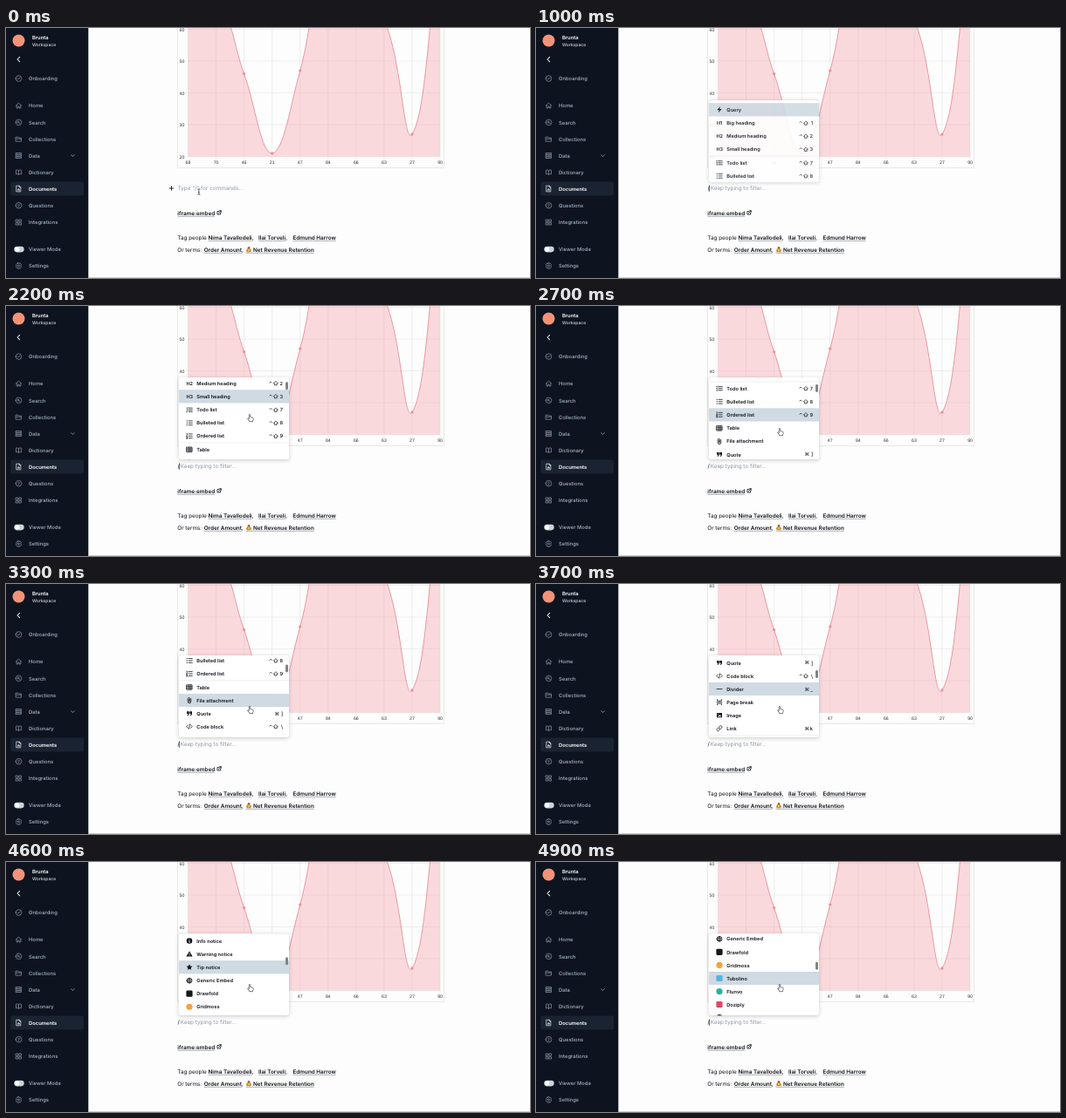
An HTML page that plays this animation: 600x287 px, repeating every 5 s.

```html
<!DOCTYPE html>
<html lang="en">
<head>
<meta charset="utf-8">
<title>Slash command menu</title>
<style>
html, body { margin: 0; width: 100%; height: 100%; overflow: hidden; background: #fdfdfd; }
svg { display: block; width: 100%; height: 100%; }
text { font-family: Inter, "Liberation Sans", sans-serif; text-rendering: geometricPrecision; white-space: pre; }
.axis { font-family: "Liberation Sans", Arial, sans-serif; }
.key { font-family: "DejaVu Sans", sans-serif; }
</style>
</head>
<body>
<svg id="stage" viewBox="0 0 600 287" preserveAspectRatio="none">
  <defs><clipPath id="menuClip"><rect x="198" y="82" width="126" height="94.3" rx="1.7"/></clipPath></defs>
</svg>
<script>
const stage = document.getElementById('stage');
const INK = '#10141c', HINT = '#8c96a8', BODY = 6.35;

function add(parent, tag, attrs = {}) {
  const el = document.createElementNS('http://www.w3.org/2000/svg', tag);
  for (const k in attrs) el.setAttribute(k, attrs[k]);
  parent.append(el);
  return el;
}
const group = (parent = stage) => add(parent, 'g');
const rect = (p, x, y, width, height, fill, rx = 0) => add(p, 'rect', { x, y, width, height, fill, rx });
const line = (p, d, stroke, width = 0.5) =>
  add(p, 'path', { d, stroke, fill: 'none', 'stroke-width': width });

// Text is placed by the vertical centre of its capitals.
function label(p, str, x, mid, size, fill, weight = 400, extra = {}) {
  const el = add(p, 'text', { x, y: mid + size * 0.36, 'font-size': size, fill, 'font-weight': weight, ...extra });
  el.textContent = str;
  return el;
}

// Icons live on a 24-unit grid.
function icon(p, d, x, y, size, color, filled = false, width = 2) {
  return add(p, 'path', {
    d, transform: `translate(${x - size / 2} ${y - size / 2}) scale(${size / 24})`,
    fill: filled ? color : 'none', 'fill-rule': 'evenodd',
    stroke: filled ? 'none' : color, 'stroke-width': width,
    'stroke-linecap': 'round', 'stroke-linejoin': 'round'
  });
}

const RING = 'M2 12a10 10 0 1 0 20 0a10 10 0 1 0-20 0z';
const ICONS = {
  check: RING + 'M8 12l3 3 5-6',
  home: 'M3 12l9-9 9 9M5 10v11h5v-6h4v6h5V10',
  search: RING + 'M8 11a3 3 0 1 0 6 0a3 3 0 1 0-6 0M16.500 16.500l-3-3',
  folder: 'M3 5h7l2 3h9v12H3zM3 11h18',
  data: 'M3 3h18v5H3zM3 9.500h18v5H3zM3 16h18v5H3z',
  book: 'M12 6c-3-2-6-2-9-1v14c3-1 6-1 9 1 3-2 6-2 9-1V5c-3-1-6-1-9 1v14',
  doc: 'M5 2h9l5 5v15H5zM14 2v5h5M9 17v-3M12 17v-5M15 17v-2',
  help: RING + 'M9.500 10c0-3.500 5-3.500 5 0 0 2-2.500 2-2.500 4M12 17v.1',
  blocks: 'M3 3h7v7H3zM14 3h7v7h-7zM3 14h7v7H3zM14 14h7v7h-7z',
  gear: 'M9 12a3 3 0 1 0 6 0a3 3 0 1 0-6 0M10 2h4l1 3 3-1 3 4-2 4 2 4-3 4-3-1-1 3h-4l-1-3-3 1-3-4 2-4-2-4 3-4 3 1z',
  bolt: 'M15 0L3 14h8l-3 10 13-14h-8z',
  todo: 'M1 5l2 2 3-4M1 12l2 2 3-4M1 19l2 2 3-4M10 5h13M10 12h13M10 19h13',
  bullets: 'M2 4h2M2 12h2M2 20h2M9 4h14M9 12h14M9 20h14',
  ordered: 'M2 2h1v5M1 11h3l-3 4h3M1 18h3v4H1M9 4h14M9 12h14M9 20h14',
  table: 'M2 3h20v18H2zM2 9h20M2 15h20M9 3v18M15.500 3v18',
  clip: 'M18 6v11a6 6 0 0 1-12 0V6a4 4 0 0 1 8 0v10a2 2 0 0 1-4 0V7',
  quote: 'M2 4h9v9c0 4-3 7-7 7v-3c2 0 3-2 3-4H2zM13 4h9v9c0 4-3 7-7 7v-3c2 0 3-2 3-4h-5z',
  code: 'M7 6l-6 6 6 6M17 6l6 6-6 6M14 3l-4 18',
  rule: 'M2 12h20',
  page: 'M4 2v5h16V2M4 22v-5h16v5M2 12h3M8 12h3M13 12h3M19 12h3',
  image: 'M2 3h20v18H2zM5 17h14l-5-7-4 5-2-2zM6 6h3v3H6z',
  link: 'M10 14a5 5 0 0 0 7 0l4-4a5 5 0 0 0-7-7l-2 2M14 10a5 5 0 0 0-7 0l-4 4a5 5 0 0 0 7 7l2-2',
  info: 'M1 12a11 11 0 1 0 22 0a11 11 0 1 0-22 0zM10.500 5h3v3h-3zM10.500 10h3v9h-3z',
  warn: 'M12 1L24 22H0zM10.700 8h2.600v7h-2.600zM10.700 17h2.600v2.500h-2.600z',
  star: 'M12 1l3.400 7.400 8 .9-6 5.400 1.700 8L12 18.700 4.900 22.700l1.700-8-6-5.400 8-.9z',
  globe: RING + 'M4 9h16M5 16h14M12 3c-5 5-5 13 0 18M12 3c5 5 5 13 0 18'
};
const SOLID = ['bolt', 'quote', 'info', 'warn', 'star', 'image'];

function drawChart() {
  const g = group();
  const xs = i => 208.5 + i * 32.06, ys = v => 147.5 - (v - 20) * 3.65;
  const values = [68, 70, 46, 21, 47, 84, 66, 63, 27, 90];
  const pts = values.map((v, i) => [xs(i), ys(v)]);
  line(g, 'M196.500 0V160.500H501.500V0', '#e4e4e4', 0.8);
  values.forEach((v, i) => {
    line(g, `M${xs(i)} 0V150.500`, '#dedede', 0.5);
    label(g, v, xs(i), 154.6, 5.2, '#333', 400, { class: 'axis', 'text-anchor': 'middle' });
  });
  for (let v = 20; v <= 60; v += 10) {
    line(g, `M205.500 ${ys(v)}H497`, '#dedede', 0.5);
    label(g, v, 204.3, ys(v) + 0.2, 5.2, '#333', 400, { class: 'axis', 'text-anchor': 'end' });
  }
  // Cardinal spline whose handles are weighted by neighbour distance.
  const handles = pts.map((p, i) => {
    const a = pts[i - 1] || p, b = pts[i + 1] || p;
    const da = Math.hypot(p[0] - a[0], p[1] - a[1]), db = Math.hypot(b[0] - p[0], b[1] - p[1]);
    const move = k => [p[0] + k * (b[0] - a[0]), p[1] + k * (b[1] - a[1])];
    return [move(-0.4 * da / (da + db)), move(0.4 * db / (da + db))];
  });
  let d = `M${pts[0]}`;
  for (let i = 1; i < pts.length; i++) d += `C${handles[i - 1][1]} ${handles[i][0]} ${pts[i]}`;
  add(g, 'path', { d: `${d}V147.500H208.500Z`, fill: 'rgba(243,140,150,.32)' });
  line(g, d, '#e3868f', 0.8);
  for (const [cx, cy] of pts)
    add(g, 'circle', { cx, cy, r: 1.3, fill: '#ee939b', stroke: '#e3808a', 'stroke-width': 0.5 });
}

function drawSidebar() {
  const g = group();
  rect(g, 0, 0, 94.3, 287, '#0d1420');
  add(g, 'circle', { cx: 14.5, cy: 14.5, r: 7, fill: '#f29377' });
  label(g, 'Brunta', 30, 10.7, 5.8, '#fff', 600);
  label(g, 'Workspace', 30, 18.8, 5, '#d3d7de', 500);
  icon(g, 'M15 5l-7 7 7 7', 14.5, 36, 9, '#f0f2f5', false, 2.8);
  rect(g, 5.3, 176.5, 83.7, 16, '#1a2331', 2.5);
  const rows = [
    [58, 'check', 'Onboarding'], [89, 'home', 'Home'], [108.3, 'search', 'Search'],
    [127.5, 'folder', 'Collections'], [146.5, 'data', 'Data'], [165.5, 'book', 'Dictionary'],
    [184.5, 'doc', 'Documents'], [203.7, 'help', 'Questions'], [223, 'blocks', 'Integrations'],
    [254, '', 'Viewer Mode'], [273, 'gear', 'Settings']
  ];
  for (const [y, name, str] of rows) {
    const on = str === 'Documents';
    if (name) icon(g, ICONS[name], 14.5, y, 8, on ? '#fff' : '#94a0b1');
    label(g, str, 26, y + 0.2, 5.85, on ? '#fff' : '#aab4c3', on ? 600 : 500);
  }
  icon(g, 'M5 9l7 7 7-7', 76.5, 146.5, 6, '#a6b0c0', false, 3);
  rect(g, 9.3, 250.8, 11.4, 6.6, '#cbd3dc', 3.3);
  add(g, 'circle', { cx: 12.7, cy: 254.1, r: 2.7, fill: '#fff' });
}

function link(p, str, x, mid, start = x) {
  const el = label(p, str, x, mid, BODY, INK, 600);
  const end = x + el.getComputedTextLength();
  line(p, `M${start} ${mid + 4}H${end}`, '#555b66', 0.5);
  return end;
}

function drawDocument() {
  const g = group();
  const plain = (str, x, y) => label(g, str, x, y, BODY, INK);
  rect(g, 94.3, 286.4, 505.7, 0.6, '#b5b5b5');
  link(g, 'iframe:embed', 196.3, 212.3);
  icon(g, 'M11 5H3v16h16v-8M14 2h8v8M22 2L10 14', 244, 212, 5.4, INK, false, 3.6);
  plain('Tag people', 196.3, 240.3);
  plain(',', link(g, 'Nima Tavallodeli', 231.5, 240.3), 240.3);
  plain(',', link(g, 'Ilai Torveli', 289, 240.3), 240.3);
  link(g, 'Edmund Harrow', 328.5, 240.3);
  plain('Or terms:', 196.3, 254.3);
  plain(',', link(g, 'Order Amount', 226.7, 254.3), 254.3);
  icon(g, 'M8 1h9l-2 6c5 3 8 9 7 13-1 4-19 4-20 0-1-4 2-10 7-13z', 278, 254.2, 6.8, '#c18a35', true);
  line(g, 'M276.500 252.400h3', '#6b4a1c', 0.7);
  add(g, 'circle', { cx: 278, cy: 255.2, r: 1.1, fill: '#f0c95a' });
  link(g, 'Net Revenue Retention', 283, 254.3, 274.5);
}

const ROWS = [
  ['Query', 'bolt'], '-',
  ['Big heading', 'H1', '1'], ['Medium heading', 'H2', '2'], ['Small heading', 'H3', '3'], '-',
  ['Todo list', 'todo', '7'], ['Bulleted list', 'bullets', '8'], ['Ordered list', 'ordered', '9'], '-',
  ['Table', 'table'], ['File attachment', 'clip'], ['Quote', 'quote', '⌘ ]'], ['Code block', 'code', '\\'],
  ['Divider', 'rule', '⌘ _'], ['Page break', 'page'], ['Image', 'image'], ['Link', 'link', '⌘ k'], '-',
  ['Info notice', 'info'], ['Warning notice', 'warn'], ['Tip notice', 'star'], '-',
  ['Generic Embed', 'globe'], ['Drawfold', '#15171a'], ['Gridmoss', '#f3a33a', true],
  ['Tubolino', '#58b4dc'], ['Flunvo', '#20b59c', true], ['Doziply', '#dd4a6c'], ['', '#15171a', true]
];
const PITCH = 15.05, FIRST = 93;

function drawShortcut(p, keys, y) {
  const last = keys[keys.length - 1];
  label(p, last, 317, y, 5.7, INK, 500, { 'text-anchor': 'end' });
  if (keys[0] === '⌘') {
    label(p, '⌘', 307.6, y, 5.6, INK, 400, { class: 'key' });
    return;
  }
  line(p, `M301.700 ${y - 0.3}l1.500-1.500 1.500 1.500`, INK, 0.7);
  line(p, `M306.400 ${y + 0.2}l2.500-2.500 2.500 2.500h-1.200v1.900h-2.600v-1.900z`, INK, 0.7);
}

function drawMenu() {
  const menu = group();
  rect(menu, 198, 82, 126, 94.3, '#fff', 1.7).style.filter =
    'drop-shadow(0 0 .4px rgba(0,0,0,.3)) drop-shadow(0 1.5px 2.5px rgba(0,0,0,.18))';
  const view = add(menu, 'g', { 'clip-path': 'url(#menuClip)' });
  const list = group(view);
  const hover = rect(list, 198, 0, 126, PITCH, '#cfdae2');
  const mids = [];
  let y = FIRST;
  for (const row of ROWS) {
    if (row === '-') {
      line(list, `M198 ${y - PITCH / 2 + 0.22}H324`, '#dfe3e8', 0.5);
      y += 0.45;
      continue;
    }
    const [str, mark, extra] = row;
    if (mark[0] === '#') {
      rect(list, 206.4, y - 3.6, 7.2, 7.2, mark, extra ? 3.6 : 1.4);
    } else if (ICONS[mark]) {
      icon(list, ICONS[mark], 210, y, 7.2, INK, SOLID.includes(mark), 2.6);
    } else {
      label(list, mark, 210.2, y, 5.5, INK, 600, { 'text-anchor': 'middle' });
    }
    label(list, str, 218.3, y + 0.1, 5.65, INK, 600);
    if (typeof extra === 'string') drawShortcut(list, extra, y);
    mids.push(y);
    y += PITCH;
  }
  const thumb = rect(menu, 320.1, 0, 2.9, 9, '#808080', 1.4);
  return { menu, list, hover, thumb, mids };
}

drawChart();
drawSidebar();
drawDocument();

const idle = group();
line(idle, 'M186.900 184h5.200M189.500 181.400v5.200', INK, 0.9);
label(idle, 'Type "/" for commands...', 196.5, 184, BODY, HINT);

const typed = group();
label(typed, '/', 196.4, 184, BODY, INK);
label(typed, 'Keep typing to filter...', 199.7, 184, BODY, HINT);
const caret = rect(stage, 0, 180.4, 0.6, 7.4, '#111');
const beam = line(stage, 'M219.300 184.700q1.500 0 1.500.8v5q0 .8-1.500.8M222.300 184.700q-1.500 0-1.500.8M222.300 191.300q-1.500 0-1.500-.8M220 188.700h1.600', '#222', 0.7);

const ui = drawMenu();
const hand = add(stage, 'path', {
  d: 'M-.7.500Q-.7-.2 0-.2T.7.500V3l.9.100.900.200.900.300Q4.200 3.700 4.200 4.800 4.200 6.300 3.500 7.200V8.100H-.3V7.400L-2.300 4.900Q-2.500 4.200-1.700 4.200L-.7 5z',
  fill: '#fff', stroke: '#222', 'stroke-width': 0.6, 'stroke-linejoin': 'round'
});

const LOOP = 5000, STEP = 100;
const TYPE_AT = 800, MENU_AT = 900, POINT_AT = 1900;
const SCROLL = [
  [1800, 0], [1900, 4], [2000, 12], [2100, 21], [2200, 34.9], [2400, 45], [2600, 50], [2700, 59.4],
  [2900, 71], [3200, 79.5], [3300, 81.2], [3500, 102], [3800, 158], [4000, 179], [4100, 182.9],
  [4300, 182.9], [4500, 206], [4700, 254], [4800, 271], [4900, 277.8]
];
const TIP = [[2200, 124.6], [2600, 140.6]];
const FADE = [[800, 0], [900, 0.45], [1000, 0.9], [1100, 1]];
const DROP = [[900, 2.5], [1000, 0.7], [1100, 0]];

function at(keys, t) {
  const i = keys.findIndex(k => k[0] > t);
  if (i === 0) return keys[0][1];
  if (i < 0) return keys[keys.length - 1][1];
  const [t0, a] = keys[i - 1], [t1, b] = keys[i];
  return a + (b - a) * (t - t0) / (t1 - t0);
}
const show = (el, on) => el.setAttribute('visibility', on ? 'visible' : 'hidden');

// The highlight trails the pointer by one step while the list scrolls.
function hoverRow(t) {
  if (t < POINT_AT) return 0;
  const y = at(TIP, t - STEP) + at(SCROLL, t - STEP);
  return ui.mids.findIndex(mid => y <= mid + PITCH / 2 + 0.4);
}

function caretOn(t) {
  if (t < TYPE_AT) return t >= 200 && t < 700;
  return (t + 100) % 1000 < 500 || t < MENU_AT;
}

function draw(t) {
  const open = t >= TYPE_AT, pointing = t >= POINT_AT;
  show(idle, !open);
  show(beam, !open);
  show(typed, open);
  show(caret, caretOn(t));
  caret.setAttribute('x', open ? 198.4 : 196);

  show(ui.menu, t >= MENU_AT);
  ui.menu.setAttribute('opacity', at(FADE, t));
  ui.menu.setAttribute('transform', `translate(0 ${at(DROP, t)})`);
  const scroll = at(SCROLL, t);
  ui.list.setAttribute('transform', `translate(0 ${-scroll})`);
  ui.hover.setAttribute('y', ui.mids[hoverRow(t)] - PITCH / 2);
  ui.thumb.setAttribute('y', 83.3 + 0.113 * scroll);
  ui.thumb.setAttribute('opacity', pointing ? 1 : 0);

  show(hand, pointing);
  hand.setAttribute('transform', `translate(279 ${at(TIP, t)})`);
}

const start = performance.now();
function tick() {
  const t = (performance.now() - start) % LOOP;
  draw(Math.floor(t / STEP) * STEP);
  requestAnimationFrame(tick);
}
tick();
</script>
</body>
</html>
```
